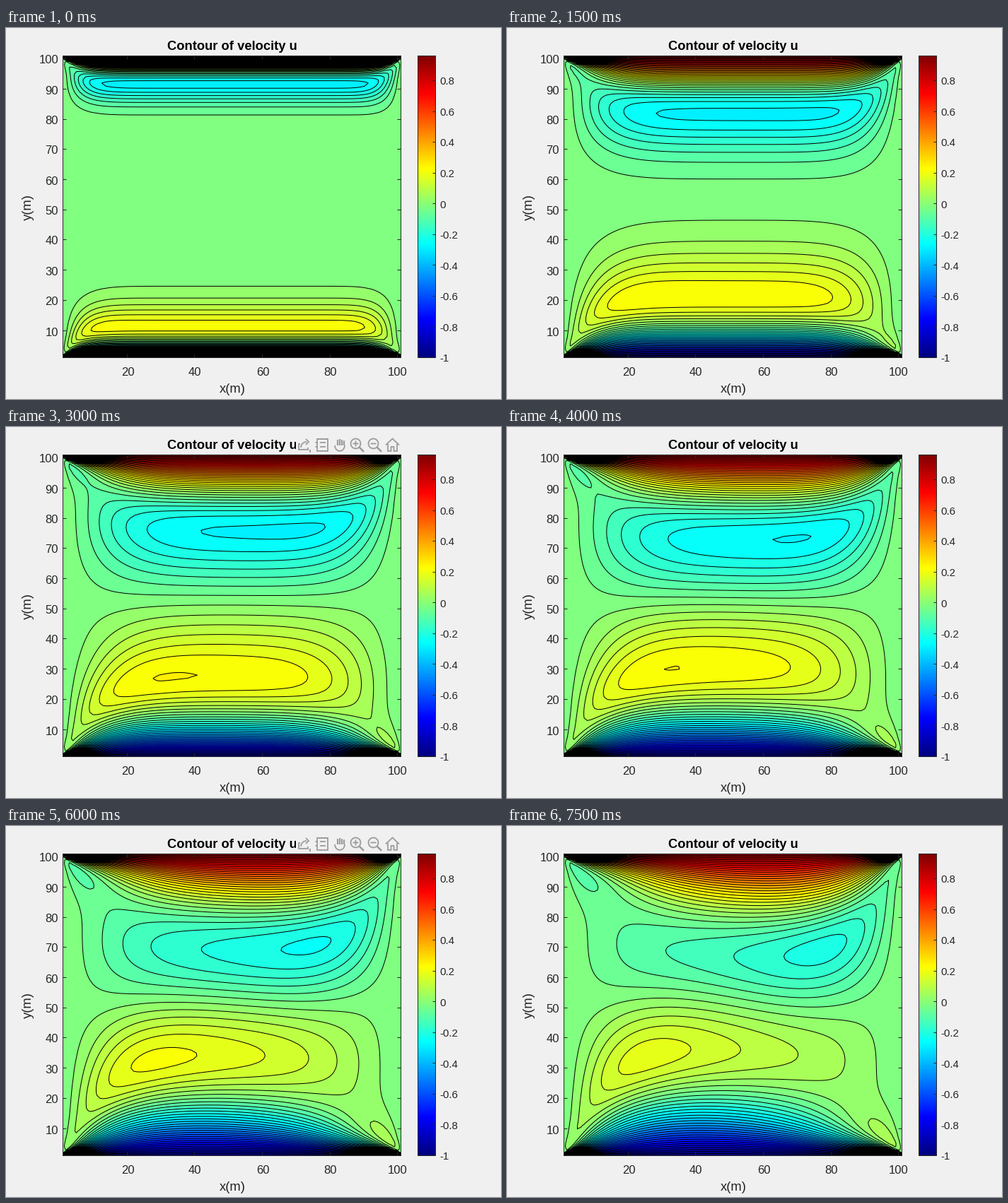
Recreate the animation shown at these times as a matplotlib script. Size 700 px wide and 525 px high, loop 8 s.

```python
import numpy as np
import matplotlib.pyplot as plt
from matplotlib.animation import FuncAnimation
from matplotlib.colors import LinearSegmentedColormap
from matplotlib.patches import PathPatch, Rectangle
from matplotlib.path import Path

W, H, DPI = 700, 525, 100
PX = 72 / DPI                      # one pixel in points
N, CELL_RE = 101, 1.0              # nodes per side, Reynolds number per cell
FRAMES, STEPS, INTERVAL = 16, 50, 500
TOOLBAR_ON = {1, 6, 10, 11, 12}
LEFT, RIGHT, TOP, BOTTOM = 80.5, 558.5, 39.5, 466.5
BAR_L, BAR_R = 582.5, 607.5
BG, INK, ICON = "#f0f0f0", "#262626", "#9c9c9c"


# ---- cavity flow: vorticity and stream function, one Gauss-Seidel sweep each
def diagonals():
    """Anti-diagonals of the inner nodes, with their west and south neighbours."""
    cells = []
    for d in range(2, 2 * N - 3):
        j0, j1 = max(1, d - N + 2), min(N - 2, d - 1)
        a, b = j0 * N + d - j0, j1 * N + d - j1 + 1
        cells.append([slice(a - k, b - k, N - 1) for k in (0, 1, N)])
    return cells


CELLS = diagonals()
INNER = np.s_[1:-1, 1:-1]


def sweep(field, rhs, west, south):
    f, r, p, q = field.ravel(), rhs.ravel(), west.ravel(), south.ravel()
    for c, w, s in CELLS:
        f[c] = r[c] + p[c] * f[w] + q[c] * f[s]


def solve():
    psi, om, rhs, west, south = (np.zeros((N, N)) for _ in range(5))
    quarter = np.full((N, N), 0.25)
    shots = []
    for step in range(1, FRAMES * STEPS + 1):
        rhs[INNER] = (psi[1:-1, 2:] + psi[2:, 1:-1] + om[INNER]) / 4
        sweep(psi, rhs, quarter, quarter)

        om[0] = -2 * (psi[1] + 1)
        om[-1] = -2 * (psi[-2] + 1)
        om[1:-1, 0] = -2 * psi[1:-1, 1]
        om[1:-1, -1] = -2 * psi[1:-1, -2]

        cx = CELL_RE / 4 * (psi[2:, 1:-1] - psi[:-2, 1:-1])
        cy = CELL_RE / 4 * (psi[1:-1, :-2] - psi[1:-1, 2:])
        west[INNER], south[INNER] = (1 + cx) / 4, (1 + cy) / 4
        rhs[INNER] = ((1 - cx) * om[1:-1, 2:] + (1 - cy) * om[2:, 1:-1]) / 4
        sweep(om, rhs, west, south)

        if step % STEPS == 0:
            u = np.zeros((N, N))
            u[INNER] = (psi[2:, 1:-1] - psi[:-2, 1:-1]) / 2
            u[0], u[-1] = -1, 1
            shots.append(u)
    return shots


shots = solve()


# ---- colours and levels
def jet_color(t):
    """Three clipped ramps, a quarter of the scale apart."""
    return tuple(np.clip(1.5 - abs(4 * t - c), 0, 1) for c in (3, 2, 1))


jet = LinearSegmentedColormap.from_list(
    "bands", [jet_color(t) for t in np.linspace(0, 1, 9)])
levels = -1 + 2 * np.arange(51) / 51
span = levels[-1] + 1
fills = [jet_color((v + 1) / span) for v in levels]
edges = np.concatenate(([-1.001], levels[1:], [1.001]))

# ---- stage, measured in pixels from the top left
plt.rcParams["font.family"] = "Liberation Sans"
fig = plt.figure(figsize=(W / DPI, H / DPI), dpi=DPI, facecolor=BG)
ax = fig.add_axes([0, 0, 1, 1])
ax.imshow(np.linspace(0, 1, 256)[:, None], cmap=jet, aspect="auto",
          origin="lower", interpolation="nearest",
          extent=(BAR_L, BAR_R, BOTTOM, TOP))
ax.set_xlim(0, W)
ax.set_ylim(H, 0)
ax.axis("off")

xs = np.linspace(LEFT, RIGHT, N)
ys = np.linspace(BOTTOM, TOP, N)


def line(x, y, color=INK, width=1, z=4):
    return ax.plot(x, y, color=color, lw=width * PX, zorder=z, snap=False,
                   solid_capstyle="butt", solid_joinstyle="miter")[0]


def box(l, r, t, b, **kw):
    x, y = [l, r, r, l, l, r], [t, t, b, b, t, t]
    return line(x, y, **kw)


def text(x, y, s, size, ha="center", color=INK, **kw):
    ax.text(x, y, s, fontsize=size * PX, ha=ha, va="baseline",
            color=color, zorder=5, **kw)


def mid(v):
    return np.floor(v) + 0.5


box(LEFT, RIGHT, TOP, BOTTOM)
box(BAR_L, BAR_R, TOP, BOTTOM)

for v in range(20, 101, 20):
    x = mid(xs[v - 1])
    for y, d in ((BOTTOM, -5), (TOP, 5)):
        line([x, x], [y, y + d])
    text(x + 0.5, 492, str(v), 16.67)
for v in range(10, 101, 10):
    y = mid(ys[v - 1])
    for x, d in ((LEFT, 5), (RIGHT, -5)):
        line([x, x + d], [y, y])
    text(74, y + 7, str(v), 16.67, ha="right")
for k in range(-5, 5):
    y = BOTTOM - (k / 5 + 1) / span * (BOTTOM - TOP)
    line([BAR_R - 4, BAR_R], [mid(y)] * 2)
    text(613, y + 5.8, f"{k / 5:g}", 15, ha="left")

text(319.5, 31, "Contour of velocity u", 18.33, color="black", weight="bold")
text(320, 515.5, "x(m)", 18.33)
ax.text(31.5, 253, "y(m)", fontsize=18.33 * PX, rotation=90, ha="center",
        va="center", color=INK, zorder=5)


# ---- hover toolbar
def make_toolbar():
    y0 = 25
    parts = [ax.add_patch(Rectangle((409.5, 13), 149, 24.5, fc=BG, ec="none",
                                    zorder=6))]

    def stroke(cx, x, y, width=1.8):
        parts.append(line(cx + np.array(x), y0 + np.array(y), ICON, width, 7))

    # share: tray, arrow, menu mark
    a = np.linspace(0, np.pi / 2, 8)
    stroke(421, [-5, -7, -7, 6, 6], [-1, -1, 7, 7, 4])
    stroke(421, 4 - 8 * np.cos(a), 4 - 8 * np.sin(a))
    stroke(421, [3, 7, 3], [-8, -4, 0])
    stroke(421, [8, 10], [9, 9], 4)
    # data tip
    parts.append(box(440, 455, 17, 34, color=ICON, width=1.8, z=7))
    for y in (-3, 3):
        stroke(447.5, [-10, -6.5], [y, y])
        stroke(447.5, [-3.5, 4.5], [y, y])
    # hand: four fingers above a round palm
    for k in range(4):
        stroke(472, [3 * k - 3] * 2, [-8 + abs(k - 1) * 1.2, 1], 2.2)
    b = np.linspace(0, np.pi, 12)
    stroke(472, 7 * np.cos(b), 1 + 8 * np.sin(b))
    # zoom in and out
    c = np.linspace(0, 2 * np.pi, 30)
    for x in (494.5, 519.5):
        stroke(x, 7 * np.cos(c), -1.5 + 7 * np.sin(c))
        stroke(x, [5, 11.5], [3.5, 10], 2.6)
        stroke(x, [-4, 4], [-1.5, -1.5])
    stroke(494.5, [0, 0], [-5.5, 2.5])
    # home
    stroke(546.5, [-9.5, 0, 9.5], [0.5, -8.5, 0.5])
    stroke(546.5, [-6.5, -6.5, -2, -2, 2, 2, 6.5, 6.5],
           [-1, 9, 9, 3, 3, 9, 9, -1])
    return parts


toolbar = make_toolbar()
drawn = []


def contour_lines(u):
    """All levels as one path, so that crowded lines add up to solid black."""
    cs = ax.contour(xs, ys, u, levels=levels[1:], colors="black")
    path = Path.make_compound_path(*[p for p in cs.get_paths() if len(p)])
    cs.remove()
    return ax.add_patch(PathPatch(path, fc="none", ec="black", lw=PX,
                                  snap=False, joinstyle="round", zorder=2))


def update(k):
    while drawn:
        drawn.pop().remove()
    u = shots[k]
    drawn.append(ax.contourf(xs, ys, u, levels=edges, colors=fills, zorder=1))
    drawn.append(contour_lines(u))
    for part in toolbar:
        part.set_visible(k in TOOLBAR_ON)
    return []


anim = FuncAnimation(fig, update, frames=FRAMES, interval=INTERVAL,
                     repeat=True, repeat_delay=0, blit=False)
plt.show()
```
